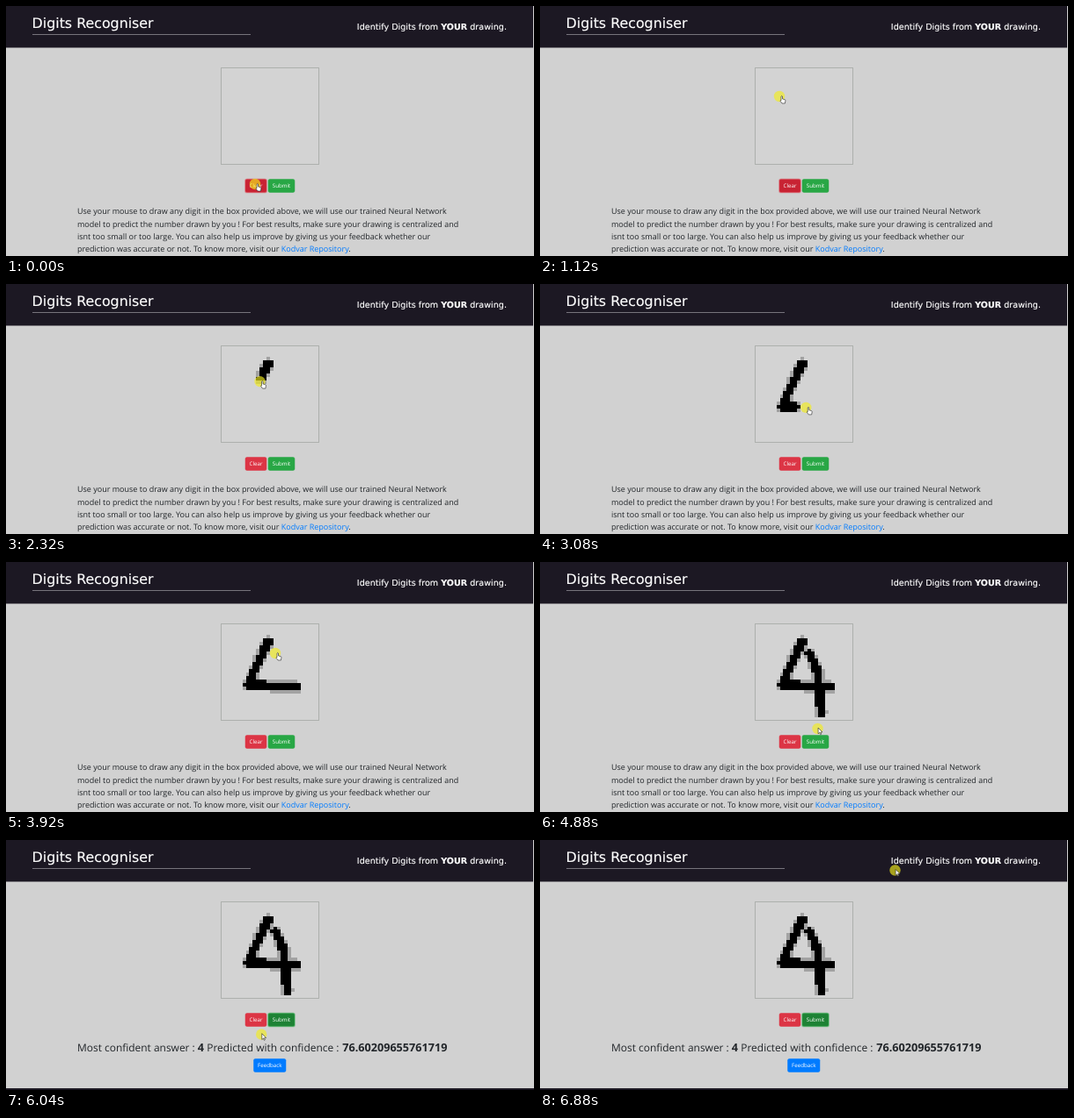
An HTML page with a canvas for the animation above (6920 ms loop, 600 by 285 pixels).

```html
<!DOCTYPE html>
<html lang="en">
<head>
<meta charset="utf-8">
<title>Digits Recogniser</title>
<style>
  html, body { margin: 0; width: 100%; height: 100%; overflow: hidden; background: #d1d1d1; }
  svg, canvas { position: absolute; left: 0; top: 0; }
  svg { width: 600px; height: 285px; }
  #ink { left: 245px; top: 71px; width: 110px; height: 110px; image-rendering: pixelated; }
  text { font-family: "Open Sans", "Noto Sans", sans-serif; fill: #212529; text-rendering: geometricPrecision; }
  .head text { font-family: "DejaVu Sans", sans-serif; fill: #fff; stroke: #fff; stroke-width: .15; }
  .body { font-size: 9.01px; }
  .result { font-size: 11.95px; }
  .result .strong { font-size: 12.65px; font-weight: 700; }
  .button text { font-size: 6.2px; fill: #fff; text-anchor: middle; }
  .button rect { fill: var(--color); stroke: var(--color); stroke-width: .5; }
  .button.focus rect { fill: var(--dark); stroke: var(--ring); stroke-width: 1.6; }
  #clear { --color: #dc3545; --dark: #c82333; --ring: #dc354580; }
  #submit { --color: #28a745; --dark: #1e8235; --ring: #28a74580; }
  #feedback { --color: #007bff; }
  #pointer path { fill: #fff; stroke: #222; stroke-width: .6; stroke-linejoin: round; }
</style>
</head>
<body>
<svg viewBox="0 0 600 285">
  <rect width="600" height="285" fill="#d1d1d1"/>
  <g class="head">
    <rect width="599" height="47.5" fill="#1c1823"/>
    <text x="29.6" y="25" font-size="15.85">Digits Recogniser</text>
    <path d="M30 32.5H278" stroke="#77747c"/>
    <text x="569" y="27" font-size="9.62" text-anchor="end">Identify Digits from <tspan font-weight="700">YOUR</tspan> drawing.</text>
  </g>
  <rect x="244.5" y="70.5" width="111" height="110" fill="#d3d3d3" stroke="#adb0ad"/>
  <g class="button" id="clear">
    <rect x="272" y="197.5" width="24" height="15" rx="1.8"/>
    <text x="284" y="207.3">Clear</text>
  </g>
  <g class="button" id="submit">
    <rect x="298" y="197.5" width="30" height="15" rx="1.8"/>
    <text x="313" y="207.3">Submit</text>
  </g>
  <g class="body" id="intro">
    <text x="81" y="237.4">Use your mouse to draw any digit in the box provided above, we will use our trained Neural Network</text>
    <text x="81" y="251.6">model to predict the number drawn by you ! For best results, make sure your drawing is centralized and</text>
    <text x="81" y="265.8">isnt too small or too large. You can also help us improve by giving us your feedback whether our</text>
    <text x="81" y="280">prediction was accurate or not. To know more, visit our <tspan fill="#007bff">Kodvar Repository</tspan>.</text>
  </g>
  <g class="result" id="result">
    <text x="81" y="241.3">Most confident answer :</text>
    <text x="217.8" y="241.3" class="strong">4</text>
    <text x="228.3" y="241.3">Predicted with confidence :</text>
    <text x="382.3" y="241.3" class="strong">76.60209655761719</text>
    <g class="button" id="feedback">
      <rect x="281.5" y="249.5" width="36.5" height="15" rx="1.8"/>
      <text x="299.8" y="259.3">Feedback</text>
    </g>
    <rect y="283" width="600" height="2" fill="#1c1823"/>
  </g>
</svg>
<canvas id="ink" width="28" height="28"></canvas>
<svg viewBox="0 0 600 285">
  <g id="pointer">
    <circle r="6.2" fill="#f3ec1c" fill-opacity=".65"/>
    <path id="hand" d="M2 0Q2.8-1.2 3.5 0V2.9L6.3 3.7Q7 4 6.9 4.9L6.4 8H3L1 5.2Q1.2 4.2 2 4.8Z"/>
    <path id="arrow" d="M.6-1V5.8L2.2 4.4 3.2 6.7 4.2 6.2 3.2 4 5.4 3.9Z"/>
  </g>
</svg>
<script>
const LOOP = 6920, GRID = 28, CELL = 110 / GRID;
const PRESS = 2040, LIFT = 3280, PRESS_AGAIN = 3940, LIFT_AGAIN = 4680;
const SUBMITTED = 5120, ANSWERED = 5320, INK_LAG = 60;
const $ = id => document.getElementById(id);
const ctx = $('ink').getContext('2d');

const clear = [283, 203], rest = [272, 103], submit = [313, 203], below = [290, 222], exit = [403.5, 34.5];
const apex = [298, 91], corner = [275, 139.8], tip = [330, 142];
const crown = [306, 104], bend = [315.5, 125], foot = [319, 172];

// The pointer glides from each stop to the next
const stops = [
  [0, clear], [80, clear], [640, rest], [1560, rest], [1920, apex],
  [PRESS, apex], [2960, corner], [LIFT, tip], [3440, tip],
  [3880, crown], [PRESS_AGAIN, crown], [4200, bend], [LIFT_AGAIN, foot],
  [SUBMITTED, submit], [ANSWERED, submit], [6000, below], [6040, below],
  [6880, exit], [LOOP, exit]
];
const ease = p => p * (1.5 - p / 2);

function position(t) {
  const i = Math.max(1, stops.findIndex(([time]) => time >= t));
  const [t0, from] = stops[i - 1], [t1, to] = stops[i];
  const p = ease((t - t0) / (t1 - t0));
  return from.map((v, axis) => v + (to[axis] - v) * p);
}

function trail(start, end) {
  const points = [];
  for (let t = start; t <= end; t += 20) {
    const [x, y] = position(t);
    points.push([(x - 245) / CELL, (y - 71) / CELL]);
  }
  return points;
}

// Cells near the trail are black, their outer neighbours grey
function drawInk(t) {
  const points = [...trail(PRESS, Math.min(t, LIFT)), ...trail(PRESS_AGAIN, Math.min(t, LIFT_AGAIN))];
  ctx.clearRect(0, 0, GRID, GRID);
  for (let row = 0; row < GRID; row++) {
    for (let col = 0; col < GRID; col++) {
      const d = Math.min(...points.map(([x, y]) => Math.hypot(x - col - .5, y - row - .5)));
      if (d > 1.75) continue;
      ctx.fillStyle = d < 1.22 ? '#000' : '#a2a2a2';
      ctx.fillRect(col, row, 1, 1);
    }
  }
}

const show = (id, on) => $(id).style.display = on ? '' : 'none';
const inside = (x, y, l, t, r, b) => x >= l && x <= r && y >= t && y <= b;

function render(t) {
  const [x, y] = position(t);
  const clickable = inside(x, y, 245, 71, 355, 181) || inside(x, y, 272, 197, 328, 213);
  $('pointer').setAttribute('transform', `translate(${x} ${y})`);
  show('hand', clickable);
  show('arrow', !clickable);
  show('intro', t < ANSWERED);
  show('result', t >= ANSWERED);
  $('clear').classList.toggle('focus', t < PRESS);
  $('submit').classList.toggle('focus', t >= SUBMITTED);
  drawInk(t - INK_LAG);
}

const begin = performance.now();
function tick() {
  render((performance.now() - begin) % LOOP);
  requestAnimationFrame(tick);
}
tick();
</script>
</body>
</html>
```
